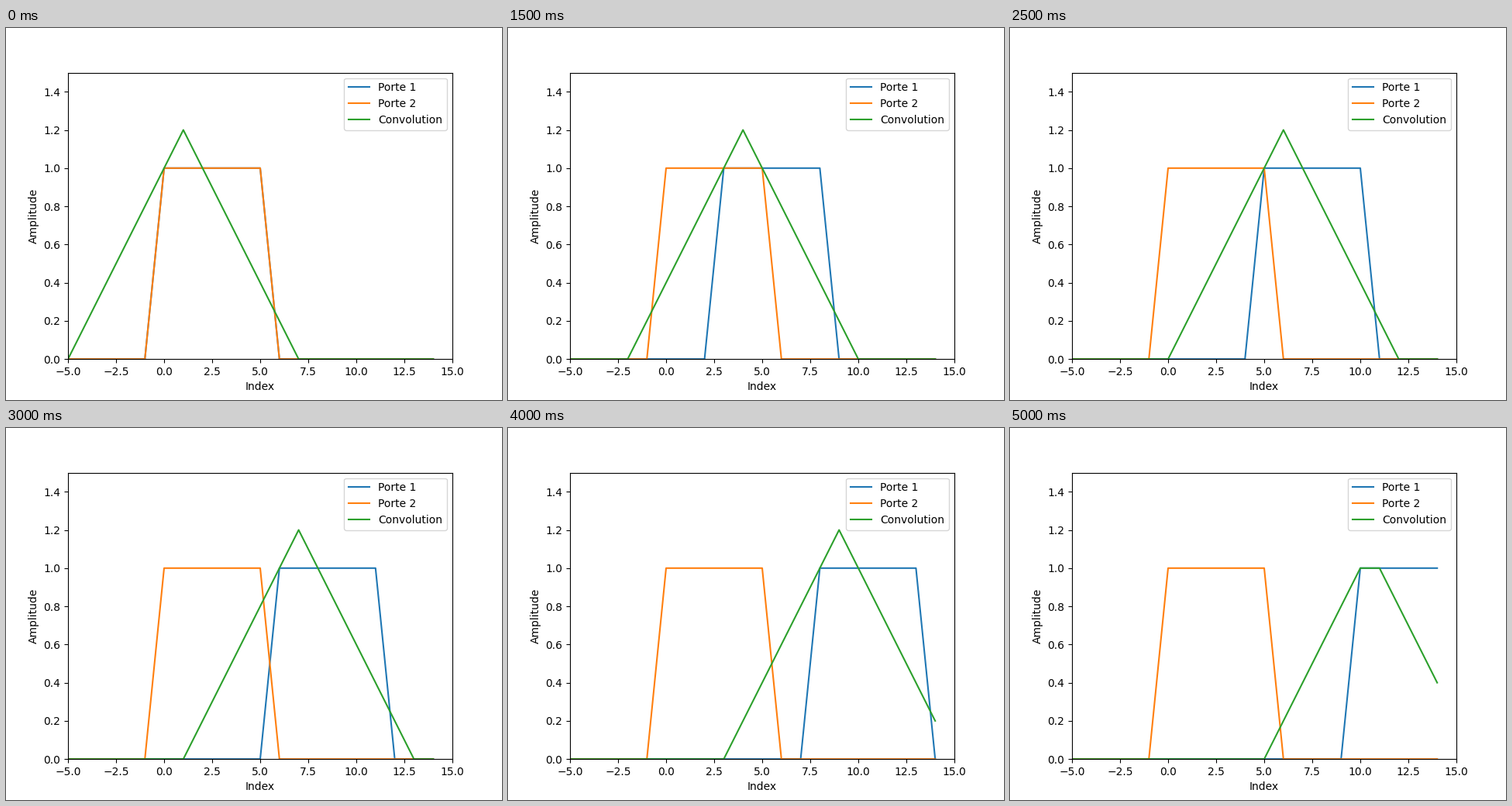
A matplotlib script that plays this animation: 640x480 px, repeating every 5500 ms.

```python
import numpy as np
import matplotlib.pyplot as plt
from matplotlib.animation import FuncAnimation

FRAMES = 11
WIDTH = 5

x = np.arange(-5, 15)


def gate(start):
    return np.where((x >= start) & (x <= start + WIDTH), 1.0, 0.0)


fixed = gate(0)

fig, ax = plt.subplots(figsize=(6.4, 4.8), dpi=100)
ax.set_xlim(-5, 15)
ax.set_ylim(0, 1.5)
ax.set_xlabel("Index")
ax.set_ylabel("Amplitude")

moving_line, = ax.plot(x, fixed, label="Porte 1")
ax.plot(x, fixed, label="Porte 2")
conv_line, = ax.plot(x, fixed, label="Convolution")
legend = ax.legend(loc="upper right")


def update(shift):
    moving = gate(shift)
    conv = np.convolve(moving, fixed, mode="same") / WIDTH
    moving_line.set_ydata(moving)
    conv_line.set_ydata(conv)

    # The legend steps aside while the full peak reaches under it
    covered = conv[x >= 10].max() > 1.19
    legend.set_loc("upper left" if covered else "upper right")
    return moving_line, conv_line, legend


anim = FuncAnimation(fig, update, frames=FRAMES, interval=500,
                     repeat=True, repeat_delay=0, blit=False)
plt.show()
```
